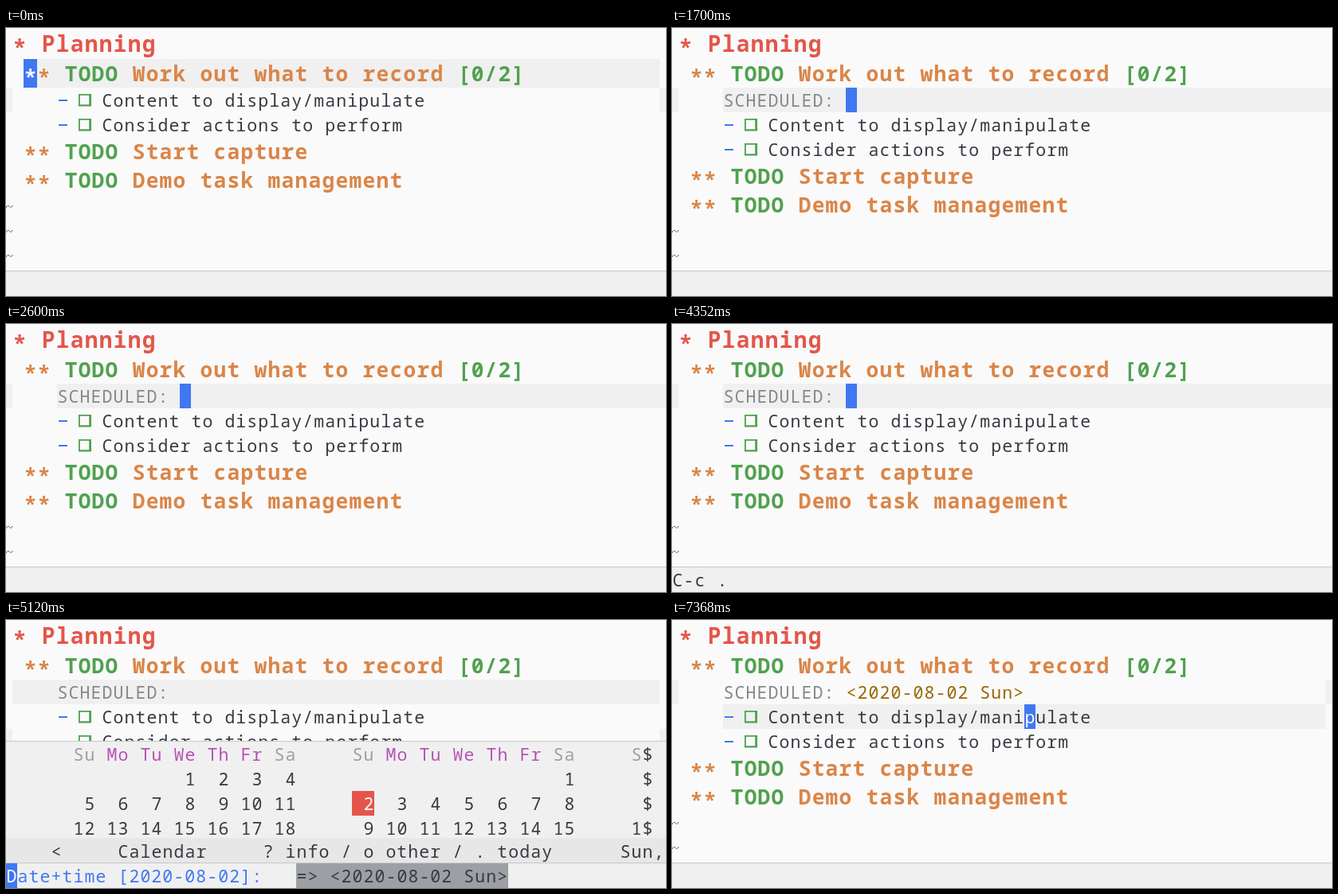
These frames come from a looping animation (828x337 px, 8 s). An HTML page:

```html
<!DOCTYPE html>
<html lang="en">
<head>
<meta charset="utf-8">
<title>Scheduling a task</title>
<style>
html, body { margin: 0; width: 100%; height: 100%; overflow: hidden; background: #fafafa; }
svg { display: block; width: 100vw; height: 100vh; }
text {
  font-family: "Noto Sans Mono", monospace;
  font-variant-ligatures: none;
  letter-spacing: 0.05em;
  white-space: pre;
}
</style>
</head>
<body>
<svg id="stage" viewBox="0 0 828 337"></svg>
<script>
const stage = document.getElementById("stage");
const LOOP = 8000;
const CELL = 14, ROW = 31, HEAD_CELL = 17, HEAD_ROW = 36, INDENT = 64;
const ADVANCE = 0.65, TRACKING = 0.05; // em per character, including the tracking set in CSS
const C = {
  bg: "#fafafa", line: "#f0f0f0", region: "#d6d6d6", rule: "#c8c8c8", bar: "#e7e7e7",
  fg: "#383a42", red: "#e45649", orange: "#da8548", green: "#50a14f", blue: "#4078f2",
  violet: "#b751b6", gold: "#986801", grey: "#9ca0a4", key: "#84888b", tilde: "#666"
};

const esc = s => s.replace(/&/g, "&amp;").replace(/</g, "&lt;");
const rect = (x, y, w, h, fill) => `<rect x="${x}" y="${y}" width="${w}" height="${h}" fill="${fill}"/>`;

function type(x, y, s, fill, cell = CELL, bold = false) {
  const size = cell / ADVANCE;
  const weight = bold ? ' font-weight="700"' : "";
  return `<text x="${x + size * TRACKING / 2}" y="${y}" font-size="${size}" fill="${fill}"${weight}>${esc(s)}</text>`;
}

// Outline stars sit at mid height, below the usual asterisk
const star = (x, y, fill, cell) => type(x, y + cell * 0.27, "*", fill, cell, true);
const body = (x, top, s, fill = C.fg) => type(x, top + 24, s, fill);
const cols = (col, top, s, fill) => body(col * CELL, top, s, fill);
const cursor = (x, top, ch = "") => rect(x, top, CELL, ROW, C.blue) + body(x, top, ch, C.bg);
const fringe = (x, top, h = ROW) => rect(x, top, 8, h, C.line);

function heading(top, title, count = "", active = false) {
  const y = top + 28;
  const put = (col, s, fill) => type(22 + col * HEAD_CELL, y, s, fill, HEAD_CELL, true);
  let out = active ? rect(22, top, 798, HEAD_ROW, C.line) + rect(22, top, HEAD_CELL, HEAD_ROW, C.blue) : "";
  out += star(22, y, active ? C.bg : C.orange, HEAD_CELL) + star(22 + HEAD_CELL, y, C.orange, HEAD_CELL);
  out += put(3, "TODO", C.green) + put(8, title, C.orange);
  return out + put(9 + title.length, count, C.green);
}

function item(top, label) {
  const box = `<path d="M91 ${top + 8}h16v15.5h-16zm1.8 1.8v11.4h11.4v-11.4z" fill="${C.green}" fill-rule="evenodd"/>`;
  return rect(66, top + 15, 11, 2, C.blue) + box + body(120, top, label);
}

const tilde = top =>
  `<path d="M0.5 ${top + 17}v-1l1.5-1.5h1.5l2 2h1l1.5-1.5v-1" fill="none" stroke="${C.tilde}"/>`;

function outline({ active, scheduled, extra = "" }) {
  let top = 75;
  let out = star(8, 30, C.red, 18) + type(44, 30, "Planning", C.red, 18, true);
  out += heading(39, "Work out what to record", "[0/2]", active) + extra;
  if (scheduled) {
    out += body(INDENT, top, "SCHEDULED:", C.key);
    top += ROW;
  }
  for (const label of ["Content to display/manipulate", "Consider actions to perform"]) {
    out += item(top, label);
    top += ROW;
  }
  for (const title of ["Start capture", "Demo task management"]) {
    out += heading(top, title);
    top += HEAD_ROW;
  }
  for (; top < 300; top += ROW) out += tilde(top);
  return out;
}

const echo = (s = "") => rect(0, 305, 828, 32, C.line) + rect(0, 305, 828, 1, C.rule) + body(0, 306, s);
const bothFringes = fringe(0, 75) + fringe(820, 75);
const lineAt = (top, x = INDENT, fill = C.line) => rect(x, top, 820 - x, ROW, fill);

// First three weeks of a month: start column, weekday of the 1st, selected day
function month(col, first, today) {
  let out = "";
  ["Su", "Mo", "Tu", "We", "Th", "Fr", "Sa"].forEach((name, i) => {
    out += cols(col + i * 3, 153, name, i % 6 ? C.violet : C.grey);
  });
  for (let day = 1; day + first <= 21; day++) {
    const slot = day + first - 1;
    const x = col + (slot % 7) * 3, top = 184 + Math.floor(slot / 7) * ROW;
    if (day === today) out += rect(x * CELL, top, CELL * 2, ROW, C.red);
    out += cols(x, top, String(day).padStart(2), day === today ? C.bg : C.fg);
  }
  return out;
}

function calendar() {
  let out = rect(0, 152, 828, 185, C.line) + rect(0, 152, 828, 1, C.rule);
  out += month(6, 3) + month(31, 6, 2);
  out += cols(56, 153, "S", C.grey) + cols(56, 246, "1");
  for (let i = 0; i < 4; i++) out += cols(57, 153 + i * ROW, "$");
  out += rect(0, 274, 828, 31, C.bar);
  out += cols(4, 275, "<") + cols(10, 275, "Calendar");
  out += cols(23, 275, "? info / o other / . today") + cols(55, 275, "Sun,");
  out += echo() + cols(1, 306, "ate+time [2020-08-02]:", C.blue) + cursor(0, 306, "D");
  return out + rect(364, 306, 266, 31, C.grey) + cols(26, 306, "=> <2020-08-02 Sun>");
}

const waiting = bothFringes + lineAt(75) + cursor(218, 75);
const scenes = [
  [0, () => bothFringes + outline({ active: true }) + echo()],
  [1000, () => bothFringes + lineAt(75, INDENT, C.region) +
    outline({ scheduled: true }) + cursor(INDENT, 75, "S") + echo()],
  [1700, () => outline({ scheduled: true, extra: waiting }) + echo()],
  [3200, () => outline({ scheduled: true, extra: waiting }) + echo("C-c .")],
  [5120, () => fringe(0, 137, 15) + fringe(820, 137, 15) + lineAt(75, 8) +
    outline({ scheduled: true }) + calendar()],
  [6420, () => bothFringes + lineAt(106) + outline({ scheduled: true }) +
    body(218, 75, "<2020-08-02 Sun>", C.gold) + cursor(442, 106, "p") + echo()]
];

let shown = null;
function draw(t) {
  const scene = scenes.filter(([start]) => start <= t).pop();
  if (scene === shown) return;
  shown = scene;
  stage.innerHTML = rect(0, 0, 828, 337, C.bg) + scene[1]();
}

function tick() {
  draw(performance.now() % LOOP);
  requestAnimationFrame(tick);
}
tick();
</script>
</body>
</html>
```
